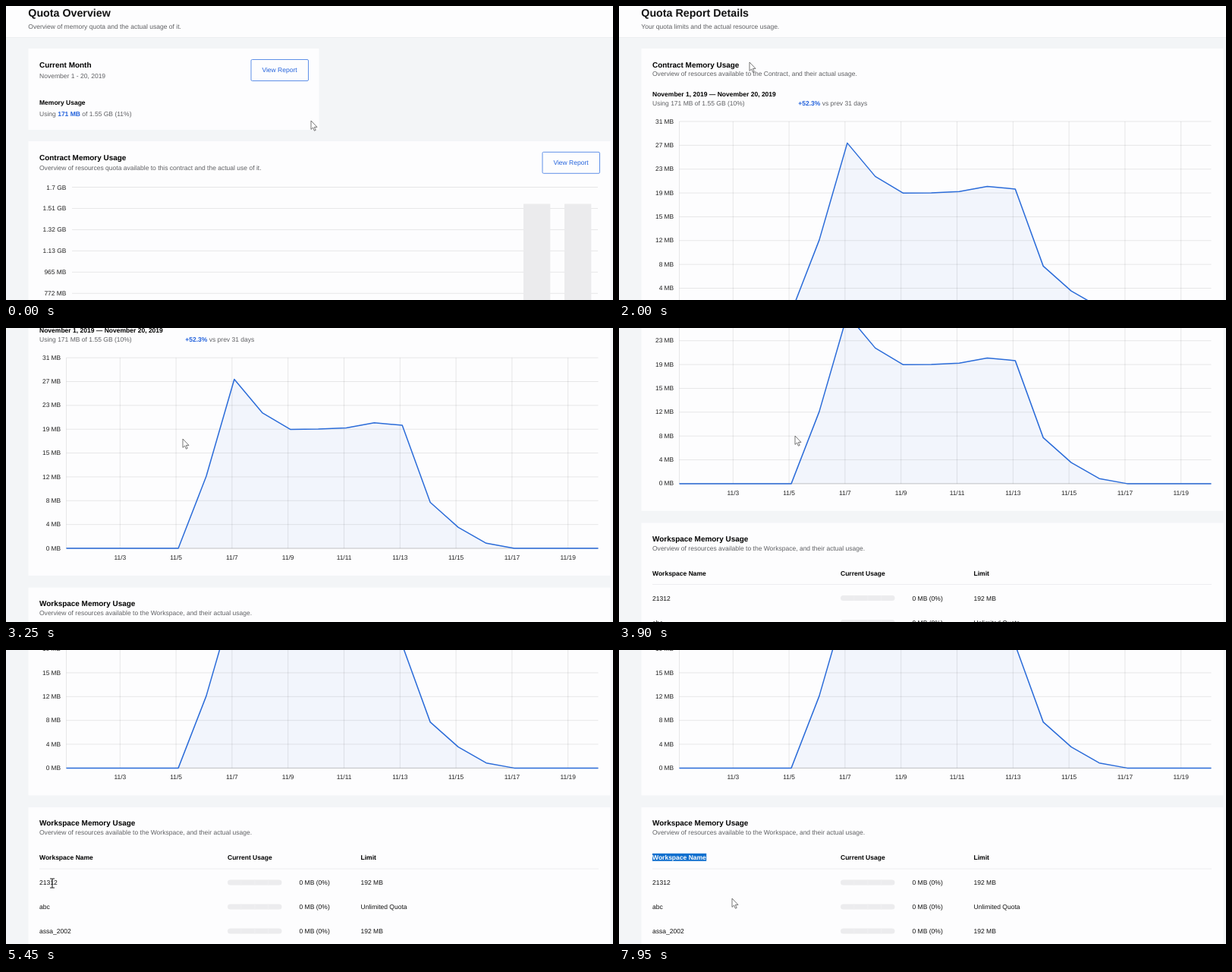
Recreate the animation shown at these times as an HTML page. Size 800 px wide and 387 px high, loop 8 s.

```html
<!DOCTYPE html>
<html lang="en">
<head>
<meta charset="utf-8">
<title>Quota Overview</title>
<style>
  html, body { margin: 0; width: 100%; height: 100%; overflow: hidden; background: #f3f5f7; }
  svg { display: block; width: 800px; height: 387px; }
  text { font: 8.53px "Liberation Sans", Arial, sans-serif; fill: #111; text-rendering: geometricPrecision; white-space: pre; }
  .title { font-size: 14.25px; font-weight: bold; }
  .head { font-size: 9.95px; font-weight: bold; fill: #000; }
  .bold { font-weight: bold; fill: #000; }
  .sub { fill: #5f6063; }
  .blue { fill: #2463dc; }
  .strong { fill: #2463dc; font-weight: bold; }
  .axis { font-size: 8.4px; fill: #222; }
  .white { font-weight: bold; fill: #fff; }
  .card { fill: #fdfdfe; }
  .grid { stroke: #000; stroke-opacity: .09; }
</style>
</head>
<body>
<svg viewBox="0 0 800 387" xmlns="http://www.w3.org/2000/svg">
  <defs><clipPath id="clip"><rect id="clipBox" x="44" y="510" height="20" width="0"/></clipPath></defs>
  <g id="overview"></g>
  <g id="report"></g>
  <path id="arrow" d="M0 0V11.4L2.6 9L4.4 13.2L6.2 12.4L4.4 8.4H8Z" fill="#fff" stroke="#555" stroke-width=".8"/>
  <path id="beam" d="M-3 -6H-.8L0 -5.4L.8 -6H3M0 -5.4V5.4M-3 6H-.8L0 5.4L.8 6H3" fill="none" stroke="#222" stroke-width="1.1"/>
</svg>
<script>
const $ = id => document.getElementById(id);
const range = (n, fn) => Array.from({ length: n }, (_, i) => fn(i)).join('');
const text = (x, y, cls, s, anchor = 'start') =>
  `<text x="${x}" y="${y}" class="${cls}" text-anchor="${anchor}">${s}</text>`;
const rect = (x, y, w, h, attrs = 'class="card"') =>
  `<rect x="${x}" y="${y}" width="${w}" height="${h}" ${attrs}/>`;
const line = (x1, y1, x2, y2, attrs = 'class="grid"') =>
  `<path d="M${x1} ${y1}L${x2} ${y2}" ${attrs}/>`;
const span = (cls, s) => `<tspan class="${cls}">${s}</tspan>`;
const button = (x, y) =>
  rect(x + .5, y + .5, 75.5, 28, 'rx="1.5" fill="#fdfdfe" stroke="#5f90e8"') +
  text(x + 38, y + 17.3, 'blue', 'View Report', 'middle');
const header = (title, sub) =>
  rect(0, 0, 800, 41) + line(0, 41.5, 800, 41.5, 'stroke="#eceef1"') +
  text(29.3, 14, 'title', title) + text(29.3, 30, 'sub', sub);
const size = mb => mb < 1024 ? mb + ' MB' : +(mb / 1024).toFixed(2) + ' GB';

function buildOverview() {
  return header('Quota Overview', 'Overview of memory quota and the actual usage of it.') +
    rect(29.5, 56, 383, 107) +
    text(44, 81, 'head', 'Current Month') +
    text(44, 94.6, 'sub', 'November 1 - 20, 2019') +
    text(44, 130.2, 'bold', 'Memory Usage') +
    text(44, 144.6, 'sub', `Using ${span('strong', '171 MB')} of 1.55 GB (11%)`) +
    button(322.5, 70) +
    rect(29.5, 178, 767, 220) +
    text(44, 202.6, 'head', 'Contract Memory Usage') +
    text(44, 216.2, 'sub', 'Overview of resources quota available to this contract and the actual use of it.') +
    button(706.5, 191.8) +
    range(6, i => {
      const y = 238.5 + 27.95 * i;
      return line(87, y, 780, y) + text(79.3, y + 3, 'axis', size(193 * (9 - i)), 'end');
    }) +
    range(2, i => rect(682 + 54 * i, 260.5, 35.3, 130, 'fill="#ebebed"'));
}

function buildChart() {
  const top = 152, step = 31.36, base = top + 8 * step, left = 79.5, right = 780.5;
  const days = 20, firstBusy = 5, busy = [95, 222.5, 178.5, 156.6, 157, 158.6, 165.3, 162, 60.5, 27.7, 6.7];
  const pts = Array.from({ length: days }, (_, i) =>
    `${left + i * (right - left) / (days - 1)} ${base - (busy[i - firstBusy] || 0)}`).join('L');
  return `<path d="M${pts}V${base}H${left}Z" fill="#2b6bd8" fill-opacity=".05"/>` +
    range(9, i => {
      const y = base - i * step;
      return line(left, y, right, y, i ? undefined : 'stroke="#bfc0c3"') +
        text(72.2, y + 2.6, 'axis', Math.round(3.85 * i) + ' MB', 'end');
    }) +
    line(left, top, left, base) +
    range(9, i => {
      const x = 150.3 + 73.8 * i;
      return line(x, top, x, base) + text(x, 417.5, 'axis', `11/${3 + 2 * i}`, 'middle');
    }) +
    `<path d="M${pts}" fill="none" stroke="#2b6cd9" stroke-width="1.5" stroke-linejoin="round"/>`;
}

function buildRow([name, limit], i) {
  const y = 556.6 + 32 * i;
  return text(44, y, '', name) +
    rect(292, y - 6.6, 71.5, 7, 'rx="3.5" fill="#ececee"') +
    range(3, k => line(309.9 + 17.9 * k, y - 6.6, 309.9 + 17.9 * k, y + .4, 'stroke="#f2f2f4" stroke-width=".7"')) +
    text(386.5, y, '', '0 MB (0%)') + text(467.5, y, '', limit);
}

function buildReport() {
  const rows = [['21312', '192 MB'], ['abc', 'Unlimited Quota'], ['assa_2002', '192 MB']];
  const headY = 523.5;
  return header('Quota Report Details', 'Your quota limits and the actual resource usage.') +
    rect(29.5, 56, 767, 382.8) +
    text(44, 81, 'head', 'Contract Memory Usage') +
    text(44, 92.4, 'sub', 'Overview of resources available to the Contract, and their actual usage.') +
    text(44, 119, 'bold', 'November 1, 2019 — November 20, 2019') +
    text(44, 131.2, 'sub', 'Using 171 MB of 1.55 GB (10%)') +
    text(236.2, 131.2, 'sub', `${span('strong', '+52.3%')} vs prev 31 days`) +
    buildChart() +
    rect(29.5, 454.6, 767, 220) +
    text(44, 478.7, 'head', 'Workspace Memory Usage') +
    text(44, 490.7, 'sub', 'Overview of resources available to the Workspace, and their actual usage.') +
    text(44, headY, 'bold', 'Workspace Name') +
    text(292, headY, 'bold', 'Current Usage') +
    text(467.5, headY, 'bold', 'Limit') +
    line(44, 535.5, 781, 535.5, 'stroke="#ededf0"') +
    rows.map(buildRow).join('') +
    `<g clip-path="url(#clip)">${rect(44, headY - 8.2, 71.2, 10, 'fill="#0f6fce"')}${text(44, headY, 'white', 'Workspace Name')}</g>`;
}

$('overview').innerHTML = buildOverview();
$('report').innerHTML = buildReport();

const LOOP = 8000, STEP = 50, SWITCH = 1100, DRAG = 6600;
const NOTCH = 49.5, GLIDE = 350;
const WHEEL = [2612, 3149, 3149, 3500, 4017];
// Each glide: start in ms, then where it ends
const GLIDES = [
  [250, 352, 86], [1450, 172, 74], [2300, 164, 153], [2850, 233, 146], [3350, 232, 142],
  [4300, 50, 290], [4700, 56, 364], [5100, 61, 307], [5500, 65, 268], [5850, 48, 275],
  [DRAG, 149, 275], [7150, 52, 363], [7550, 149, 327]
];

const progress = (t, start) => Math.max(0, Math.min(1, (t - start) / GLIDE));
const easeOut = p => 1 - (1 - p) ** 3;
const smooth = p => p * p * (3 - 2 * p);

const scrollAt = t => WHEEL.reduce((sum, start) => sum + NOTCH * easeOut(progress(t, start)), 0);
const pointerAt = t => GLIDES.reduce(([x, y], [start, tx, ty]) => {
  const p = smooth(progress(t, start));
  return [x + (tx - x) * p, y + (ty - y) * p];
}, [402, 151]);
// Names repeat every 32 px down the first column
const overName = (x, y) => x < 80 && y > 258 && Math.abs((y - 258) % 32 - 16) < 7;

function draw(now) {
  const t = Math.floor(now % LOOP / STEP) * STEP;
  const [x, y] = pointerAt(t), beam = overName(x, y);
  $('overview').style.display = t < SWITCH ? '' : 'none';
  $('report').style.display = t < SWITCH ? 'none' : '';
  $('report').setAttribute('transform', `translate(0 ${-scrollAt(t)})`);
  $('clipBox').setAttribute('width', t < DRAG ? 0 : t < 7000 ? Math.min(72, x - 44) : 72);
  $('arrow').style.display = beam ? 'none' : '';
  $('beam').style.display = beam ? '' : 'none';
  $(beam ? 'beam' : 'arrow').setAttribute('transform', `translate(${x} ${y})`);
}

const start = performance.now();
function tick() {
  draw(performance.now() - start);
  requestAnimationFrame(tick);
}
tick();
</script>
</body>
</html>
```
